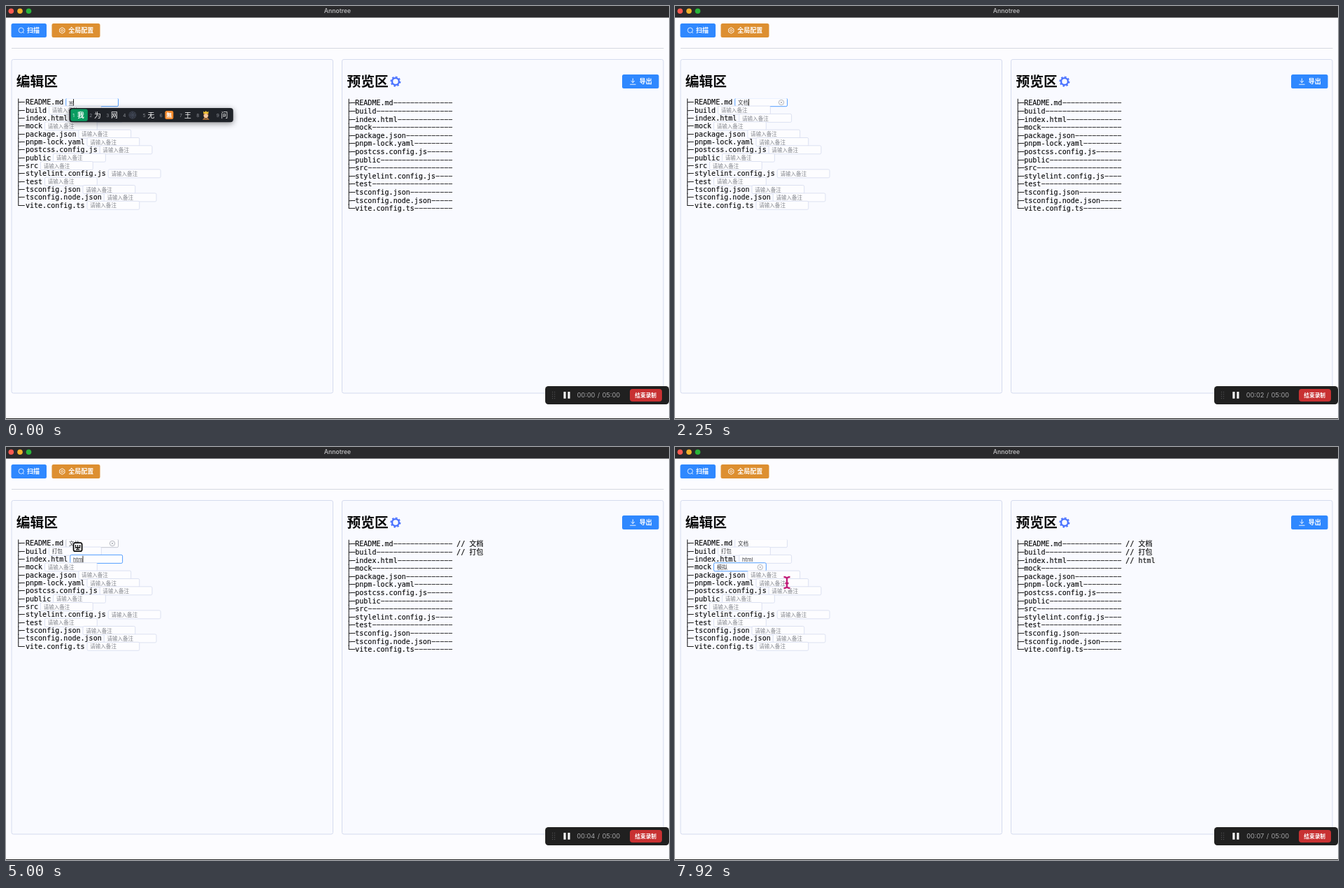
Write an HTML page that moves like this. It is 948 px wide and 591 px high and loops after 8 s.

```html
<!DOCTYPE html>
<html lang="zh">
<head>
<meta charset="utf-8">
<style>
html, body { margin: 0; width: 100%; height: 100%; overflow: hidden; background: #fcfcff; }
svg { display: block; width: 100vw; height: 100vh; }
text { font-family: Inter, "Noto Sans CJK SC", "Noto Sans CJK", sans-serif; white-space: pre; }
.mono { font-family: "DejaVu Sans Mono", "Noto Sans CJK SC", "Noto Sans CJK", monospace; stroke: #080808; stroke-width: .12; }
.popup { filter: drop-shadow(0 2px 4.5px rgba(0, 0, 0, .45)); }
</style>
</head>
<body>
<svg viewBox="0 0 948 591"><g id="base"></g><g id="live"></g></svg>
<script>
const LOOP = 8000, CHAR = 6.05, MONO = 10.05, BLUE = '#2f88ff';
const files = ['README.md', 'build', 'index.html', 'mock', 'package.json', 'pnpm-lock.yaml',
  'postcss.config.js', 'public', 'src', 'stylelint.config.js', 'test', 'tsconfig.json',
  'tsconfig.node.json', 'vite.config.ts'];
const notes = ['文档', '打包', 'html', '模拟'];

const text = (x, y, size, str, fill = '#111', more = '') =>
  `<text x="${x}" y="${y + size * .37}" font-size="${size}" fill="${fill}" ${more}>${str}</text>`;
const mono = (x, y, str) => text(x, y, MONO, str, '#080808', 'class="mono"');
const rect = (x, y, w, h, fill, r = 0, more = '') =>
  `<rect x="${x}" y="${y}" width="${w}" height="${h}" rx="${r}" fill="${fill}" ${more}/>`;
const circle = (x, y, r, fill, more = '') => `<circle cx="${x}" cy="${y}" r="${r}" fill="${fill}" ${more}/>`;
const path = (d, stroke, width = 1, more = '') =>
  `<path d="${d}" fill="none" stroke="${stroke}" stroke-width="${width}" ${more}/>`;
const at = (x, y, body) => `<g transform="translate(${x} ${y})">${body}</g>`;

const bold = 'font-weight="700"', semi = 'font-weight="600"';
const branch = i => i < files.length - 1 ? '├─' : '└─';
const rowY = i => 137.5 + i * 11.35;
const inputX = i => 19.2 + (2 + files[i].length) * CHAR;

// Candidate pictures, drawn around their own centre
const emoji = {
  web: path('M-5 0H5M0-5V5M-4-4L4 4M4-4L-4 4', '#4b5263', .6) +
    [2, 3.5, 5].map(r => circle(0, 0, r, 'none', 'stroke="#4b5263" stroke-width=".7"')).join(''),
  none: rect(-6, -6, 12, 12, '#f58a2c', 2.5) + text(-4, 0, 8, '無', '#fff', bold),
  prince: path('M-3.5 6Q0 1 3.5 6Z', '#b9783c', 1.5) + circle(0, 0, 3.8, '#8a5428') +
    circle(0, 1, 3.1, '#f6c79b') + '<path d="M-3.6-2V-5.6L-1.8-4 0-6.2 1.8-4 3.6-5.6V-2Z" fill="#f5c531"/>',
  lips: '<path d="M-5.5 0Q-3-4.5 0-2.5Q3-4.5 5.5-1Q1 6-5.5 0Z" fill="#d5202f"/>' +
    path('M-4 0Q0-1 4-.8', '#7d0d18', .8),
  kiss: circle(0, 0, 5.6, '#fbc638') + circle(-2, -1.5, .8, '#5a3510') + path('M1-1.5H3.2', '#5a3510', .9) +
    path('M0 1Q2 1.5 .3 2.5Q2 3 0 4', '#5a3510', .8) + circle(3.6, 3, 2, '#e33a4b'),
};

// Candidate lists: items separated by spaces, emoji by key
const lists = {
  w: '我 为 网 web 无 none 王 prince 问',
  we: '问 文 吻 lips kiss 温 闻 稳 纹',
  wendang: '文档 稳当 问 文 吻 温 闻 稳 纹',
  d: '的 到 点 等 对 大 多 都 第',
  dabao: '打包 大包 打爆 大宝 打报 大报 达包 搭包 答报',
  h: '和 好 会 后 还 很 话 或 号',
  m: '吗 名 买 ? 忙 们 没 嘛 门',
  mo: '吗 莫 末 摸 磨 默 魔 抹 墨',
  moni: '模拟 摸你 魔 末 莫 磨 默 抹 墨',
};

// Each step changes part of the state: row = caret row, border = blue row
const timeline = [
  [0, { row: 0, border: 0, raw: 'w', list: 'w', caret: 1, done: 0, shown: 0, badge: 0, mouse: null, hover: 1 }],
  [80, { raw: '', list: '' }],
  [580, { caret: 0 }],
  [830, { mouse: [145, 147] }],
  [1080, { caret: 1, mouse: [146, 139] }],
  [1420, { mouse: null }],
  [1580, { raw: 'w' }],
  [1670, { raw: 'we', list: 'we' }],
  [1830, { raw: 'wen' }],
  [1920, { raw: 'wend', list: 'wendang' }],
  [2000, { raw: 'wenda' }],
  [2080, { raw: 'wendan' }],
  [2170, { raw: 'wendang' }],
  [2250, { raw: '', list: '', done: 1 }],
  [2500, { shown: 1, row: 1, badge: .1 }],
  [2580, { border: 1, badge: .6 }],
  [2670, { badge: 1 }],
  [3000, { caret: 0 }],
  [3170, { raw: 'd', list: 'd', caret: 1 }],
  [3250, { raw: 'da' }],
  [3420, { raw: 'dab', list: 'dabao', badge: 0 }],
  [3500, { raw: 'dabao' }],
  [3670, { raw: '', list: '', done: 2 }],
  [4170, { shown: 2, row: 2, badge: .08 }],
  [4250, { border: 2, badge: .6 }],
  [4330, { badge: 1 }],
  [4670, { raw: 'h', list: 'h' }],
  [4830, { raw: 'ht', list: '' }],
  [5000, { raw: 'htm' }],
  [5080, { raw: 'html' }],
  [5170, { badge: 0 }],
  [5420, { raw: '', done: 3 }],
  [5750, { shown: 3, row: 3, badge: .1 }],
  [5830, { border: 3, badge: .6 }],
  [5920, { badge: 1 }],
  [6170, { caret: 0 }],
  [6580, { raw: 'm', list: 'm', caret: 1 }],
  [6750, { raw: 'mo', list: 'mo', badge: 0 }],
  [7000, { raw: 'mon', list: 'moni' }],
  [7080, { raw: 'moni' }],
  [7250, { raw: '', list: '', done: 4 }],
  [7500, { mouse: [146, 139] }],
  [7580, { mouse: [160, 150], hover: 0 }],
  [7670, { mouse: [172, 170], caret: 0 }],
  [7750, { mouse: [170, 182] }],
  [7830, { mouse: [164, 190] }],
  [7920, { mouse: [160, 194] }],
];

const stateAt = t => Object.assign({}, ...timeline.filter(([start]) => start <= t).map(([, change]) => change));

const button = (x, y, w, color, label, labelX) =>
  rect(x, y, w, 20, color, 2.5) + text(labelX, y + 10, 9, label, '#fff', bold);

function drawBase() {
  const panel = x => rect(x, 76.5, 459.5, 477.5, '#f9faff', 2.5, 'stroke="#d5dbee"');
  const hexagon = 'M0-4.2L3.6-2.1V2.1L0 4.2L-3.6 2.1V-2.1Z';
  let dots = '';
  for (let i = 0; i < 8; i++) dots += circle(781.5 + i % 2 * 3, 552.5 + (i >> 1) * 3, .7, '#4d4d4f');
  return rect(0, 0, 948, 591, '#fcfcff') + rect(0, 0, 948, 16.6, '#2a2a2c') +
    circle(7.3, 7.2, 3.8, '#fd5a50') + circle(20, 7.2, 3.8, '#f3b22a') + circle(32.5, 7.2, 3.8, '#2ab53a') +
    text(474, 7, 8.6, 'Annotree', '#b3b3b5', semi + ' text-anchor="middle"') +
    button(7.5, 25, 50.5, BLUE, '扫描', 30) +
    circle(21.7, 34.7, 3.6, 'none', 'stroke="#fff" stroke-width=".8"') + path('M24.2 37.3L25.8 39', '#fff', .8) +
    button(65.5, 25, 69, '#dd8f30', '全局配置', 89.2) +
    at(80.3, 35, path(hexagon, '#fff', .9, 'stroke-linejoin="round"') + circle(0, 0, 1.5, 'none', 'stroke="#fff" stroke-width=".8"')) +
    path('M8 60.5H940.5', '#d5d8df') + panel(8) + panel(480.5) +
    text(14.8, 107.6, 19.8, '编辑区', '#080808', bold) + text(487.4, 107.6, 19.8, '预览区', '#080808', bold) +
    circle(557, 108, 4.9, 'none', 'stroke="#466fff" stroke-width="2.3"') +
    circle(557, 108, 6.6, 'none', 'stroke="#466fff" stroke-width="1.8" pathLength="16" stroke-dasharray="1"') +
    button(881, 98, 52.5, BLUE, '导出', 905.8) +
    path('M896.3 103.5V109.5M893.6 107L896.3 109.7L899 107M892.2 112.2H900.5', '#fff', .9) +
    rect(0, 590, 948, 1, '#262626') +
    rect(771, 544, 177, 26, '#202020', 4.5) + dots +
    rect(797.3, 552, 3.2, 9.8, '#f4f4f4', .5) + rect(803.3, 552, 3.2, 9.8, '#f4f4f4', .5) +
    text(845.8, 557, 9.2, '/', '#a7a7a9') + text(878, 557, 9.2, '05:00', '#a7a7a9', 'text-anchor="end"') +
    rect(892, 548, 46, 18, '#c83132', 4) + text(899.3, 557, 7.7, '结束录制', '#fff', bold);
}

function drawRow(i, s) {
  const y = rowY(i), x = inputX(i), active = s.row === i;
  const raw = active ? s.raw : '', value = i < s.done ? notes[i] : raw;
  const border = s.border === i ? '#4094ff' : i === 0 && s.hover && s.done ? '#bcc0ca' : '#d9def0';
  const id = `value${i}`;
  let out = mono(14.4, y, branch(i)) + mono(27.9, y, files[i]) +
    rect(x, y - 5.8, 74.8, 12, '#fdfdff', 1.8, `stroke="${border}" stroke-width=".9"`) +
    text(x + 4.2, y + .6, 7.55, value || '请输入备注', value ? '#3c3e42' : '#85888f', `id="${id}"`);
  if (raw) out += `<path data-underline="${id}" stroke="#333" stroke-width=".8"/>`;
  if (active && s.caret) out += `<path data-caret="${value ? id : ''}" d="M${x + 4.5} ${y - 4.5}v10" stroke="#111" stroke-width=".9"/>`;
  if (i < s.done && (active || i === 0 && s.hover))
    out += at(x + 66.3, y + .5, circle(0, 0, 3.7, 'none', 'stroke="#a3a6ae" stroke-width=".8"') +
      path('M-1.3-1.3L1.3 1.3M1.3-1.3L-1.3 1.3', '#a3a6ae', .8));
  return out;
}

function drawPopup(s) {
  const x0 = inputX(s.row) + 4.6, y = rowY(s.row) + 18.6;
  let x = x0 + 5, body = '';
  lists[s.list].split(' ').forEach((item, i) => {
    const art = emoji[item], wide = art ? 28.5 : 14 + 10 * item.length;
    if (!i) body += rect(x0 + 2, y - 8.6, wide + .5, 17.2, '#0a9c60', 3);
    body += text(x, y + .8, 6.5, i + 1, i ? '#8d9097' : '#d4f5e5');
    if (art) body += at(x + 13.5, y, art);
    else if (item === '?') body += rect(x + 7.5, y - 4.3, 8.4, 8.6, 'none', 1, 'stroke="#fff" stroke-width=".9"') +
      text(x + 9.6, y, 7, '?', '#fff');
    else body += text(x + 6.6, y, 9.8, item, '#fff', i ? '' : semi);
    x += wide;
  });
  return `<g class="popup">${rect(x0, y - 10.2, x - x0, 20.4, '#202329', 4)}${body}</g>`;
}

const drawBadge = s => `<g opacity="${s.badge}">` + at(inputX(s.row) + 10.8, rowY(s.row) - 17,
  rect(-6, -6, 12, 12, '#fff', 2, 'stroke="#0b0b0b" stroke-width="1.8"') +
  path('M-3-3.2V.8H3V-3.2M0-3.2V3.4M-2.6 3.4H2.6', '#0b0b0b', 1.3)) + '</g>';

function drawMouse([x, y]) {
  const beam = 'M-4.5-8Q-1-8 0-6Q1-8 4.5-8M0-6V6M-4.5 8Q-1 8 0 6Q1 8 4.5 8M-2.5 1H2.5';
  return at(x, y, path(beam, '#fff', 4.2) + path(beam, '#c01c78', 2.4));
}

function drawLive(t) {
  const s = stateAt(t), seconds = Math.max(0, Math.floor((t - 165) / 1000));
  const rows = files.map((_, i) => drawRow(i, s)).join('');
  // The minus sign gives the wide leader dashes
  const preview = files.map((name, i) => mono(487.1, 138.6 + i * 11.6,
    branch(i) + name + '−'.repeat(23 - name.length) + (i < s.shown ? ' // ' + notes[i] : ''))).join('');
  return `<clipPath id="tree"><path d="M8 132.4H467V554H8Z"/></clipPath><g clip-path="url(#tree)">${rows}</g>` + preview +
    text(842.3, 557, 9.2, '00:0' + seconds, '#a7a7a9', 'text-anchor="end"') +
    (s.list ? drawPopup(s) : '') + (s.badge ? drawBadge(s) : '') + (s.mouse ? drawMouse(s.mouse) : '');
}

// Underline and caret follow the measured width of the typed text
function fitMarks(root) {
  const box = id => {
    const node = root.querySelector('#' + id), x = +node.getAttribute('x');
    return { x, end: x + node.getComputedTextLength(), y: +node.getAttribute('y') };
  };
  for (const mark of root.querySelectorAll('[data-underline]')) {
    const b = box(mark.dataset.underline);
    mark.setAttribute('d', `M${b.x} ${b.y + 1.5}H${b.end}`);
  }
  for (const mark of root.querySelectorAll('[data-caret]')) {
    if (!mark.dataset.caret) continue;
    const b = box(mark.dataset.caret);
    mark.setAttribute('d', `M${b.end + .4} ${b.y - 7.8}v10`);
  }
}

const live = document.getElementById('live');
let last = '';
document.getElementById('base').innerHTML = drawBase();

function frame() {
  const markup = drawLive(performance.now() % LOOP);
  if (markup !== last) {
    live.innerHTML = last = markup;
    fitMarks(live);
  }
  requestAnimationFrame(frame);
}
frame();
</script>
</body>
</html>
```
